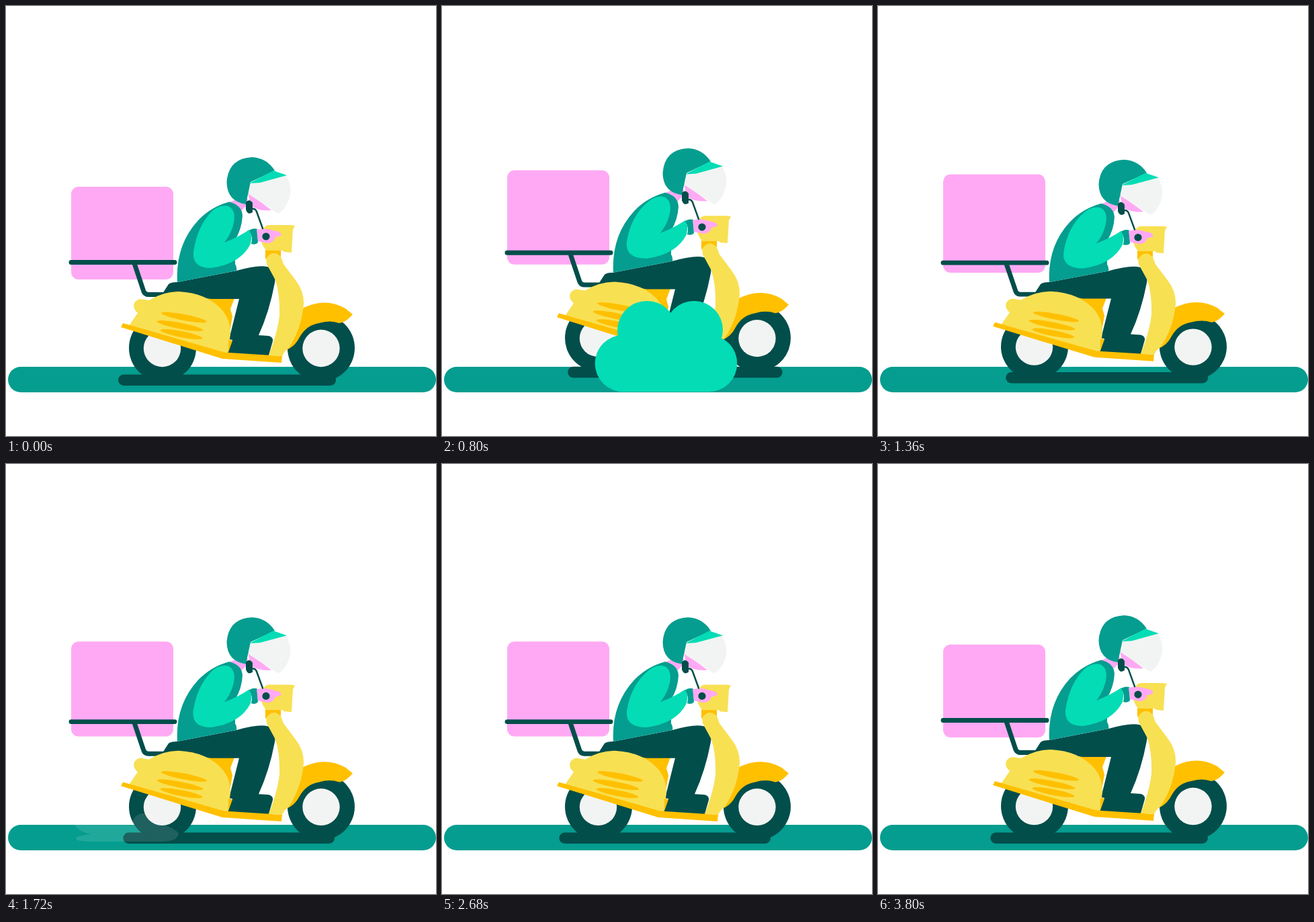
An HTML page for the animation above (3.84 s loop, 640 by 640 pixels).

```html
<!DOCTYPE html>
<html lang="en">
<head>
<meta charset="utf-8">
<title>Scooter delivery</title>
<style>
  html, body { margin: 0; width: 100%; height: 100%; overflow: hidden; background: #fff; }
  svg { display: block; width: 100vw; height: 100vh; }
  .teal { fill: #049d8f; }
  .mint { fill: #03dcb5; }
  .dark { fill: #024e4b; }
  .yellow { fill: #f8e053; }
  .orange { fill: #ffc000; }
  .pink { fill: #ffa9f4; }
  .grey { fill: #f2f4f3; }
  .line { fill: none; stroke: #024e4b; stroke-width: 7; stroke-linecap: round; stroke-linejoin: round; }
</style>
</head>
<body>
<svg viewBox="0 0 640 640">
  <rect class="teal" x="3" y="537" width="637" height="38" rx="19"/>
  <rect id="shadow" class="dark" height="16.500" rx="8.250"/>
  <rect id="box" class="pink" x="97" width="152" rx="11"/>

  <g id="scooter">
    <circle class="dark" cx="233" cy="509" r="50"/>
    <circle class="dark" cx="469" cy="509" r="50"/>
    <circle class="grey" cx="232.5" cy="509.5" r="27.7"/>
    <circle class="grey" cx="469" cy="509.5" r="27.7"/>

    <path class="line" d="M97 381.5H251M191 383L205 425Q207 429.500 212 429.500H238"/>

    <path class="orange" d="M300 435H340L334 451L337 462L331 497L337 498L330 517L300 500Z"/>
    <path class="dark" d="M231 431L242 414Q245 411 255 411L343 394Q384 382 396 391Q402 399 400 412Q392 455 376 490L391 491Q398 493 397 499L391 520H329L337 497L332 496L347 436H305L250 428Z"/>
    <path class="yellow" d="M183 476L196 457Q188 450 191 442Q196 434 206 437L213 438Q234 425 257 425Q300 427 323 454Q337 472 333 496L330 517L320 517Z"/>
    <g class="orange">
      <ellipse rx="34.500" ry="4.500" transform="translate(265 463.500) rotate(11)"/>
      <ellipse rx="35" ry="4.500" transform="translate(259 476) rotate(11)"/>
      <ellipse rx="32" ry="4.500" transform="translate(261 488.500) rotate(11)"/>
      <path d="M331 497L337 498L331 515Z"/>
      <path d="M174 472L325 515.500L411 521L410 531L322 525L171 478Z"/>
      <path d="M441 450Q475 433 505 450L516 459Q506 471 496 472Q482 467 466 472Q447 475 437 493Q430 507 417 512Z"/>
      <path d="M386 363H409L409 376H386Z"/>
    </g>
    <path class="yellow" d="M387 376Q397 361 409 373L413 384Q419 392 431 408Q444 425 443 444Q440 480 421 509Q415 513 411 521L391 520Q404 487 407 461Q408 430 401 408L388 384Z"/>
    <path class="yellow" d="M391 326H424L430 327L427 333L425 367L414 366L412 364H387Q379 353 379 344L382 333Q386 326 391 326Z"/>

    <path class="pink" d="M332 292Q344 288 348 283L360 287L358 297L349 306Z"/>
    <path class="teal" d="M255 411Q252 356 286 319Q305 299 332 291.500Q351 296 352 312Q351 332 341 348L341 384Q344 389 343 394Z"/>
    <path id="arm" class="mint"/>
    <path class="teal" d="M362 334Q367 330 374 332L375 352Q372 356 365 354Q368 344 362 334Z"/>
    <path class="pink" d="M373 333Q384 330 394 333L406 336Q411 339 409 342L401 344Q398 353 389 353L375 350Z"/>
    <circle class="dark" cx="387" cy="343" r="5.600"/>

    <path class="pink" d="M360 277L395 304Q376 306 364 297Z"/>
    <path class="grey" d="M364 264L416 251Q425 265 423 281Q418 302 405 309L361 280Z"/>
    <path class="teal" d="M364 262L357 295Q329 291 328.500 262Q331 227 366 225Q388 226 400 245Z"/>
    <path class="mint" d="M362 264L398 245L418 252L378 263Z"/>
    <path class="line" style="stroke-width:2.500" d="M365 302Q371 301 373 306L382 331"/>
    <path class="dark" d="M357 292Q362 286 367 293V307Q360 312 357 303Z"/>
  </g>

  <path id="dust" fill="#fff" d="M102 537Q108 547 126 551Q104 553 104 558Q106 562 130 562H235Q256 561 257 550Q252 542 230 536Q222 520 203 520Q190 522 187 537Z"/>

  <g id="cloud" class="mint">
    <circle cx="77" cy="483" r="44"/>
    <circle cx="147" cy="482" r="43"/>
    <circle cx="42" cy="532" r="42.300"/>
    <circle cx="169" cy="532" r="42.300"/>
    <path d="M42 500H169V574.300H42Z"/>
  </g>
</svg>
<script>
  const LOOP = 3840, STEP = 40, BOB = 960;
  const part = id => document.getElementById(id);
  const [shadow, box, scooter, arm, dust, cloud] =
    ['shadow', 'box', 'scooter', 'arm', 'dust', 'cloud'].map(part);

  const set = (el, attrs) => {
    for (const key in attrs) el.setAttribute(key, attrs[key]);
  };
  const clamp = v => Math.max(0, Math.min(1, v));
  // 0 at the start of each period, 1 halfway through
  const wave = (t, period) => (1 - Math.cos(2 * Math.PI * t / period)) / 2;

  function draw(t) {
    const bob = wave(t, BOB);
    const hop = Math.sin(Math.PI * clamp((t - 480) / 960));

    // the scooter squashes towards the ground and hops once
    set(scooter, { transform: `matrix(1 0 0 ${1 - 0.0215 * bob} 0 ${13.9 * bob - 18 * hop})` });

    const top = 269 - 13 * bob - 24.5 * hop;
    set(box, { y: top, height: 138 + 9 * bob });

    set(shadow, {
      x: 167 + 20 * bob + 17.5 * hop,
      y: 548.5 - 13.5 * hop,
      width: 324 - 25 * bob + 2 * hop
    });

    const elbow = 279 - 4.5 * wave(t, 2 * BOB);
    set(arm, {
      d: `M331 298Q345 305 337 330Q333 342 325 352Q346 344 362 333Q367 340 364 354
          Q349 384 305 390Q${elbow - 2} 390 ${elbow} 366Q${elbow + 6} 326 308 304Q320 295 331 298Z`
    });

    set(cloud, { transform: `translate(${228 - 1.194 * (t - 800)} 0)` });

    const fade = clamp((t - 1560) / 160) * clamp((2400 - t) / 500);
    set(dust, { opacity: 0.11 * fade, transform: `translate(${-0.25 * (t - 1720)} 0)` });
  }

  function tick() {
    const t = performance.now() % LOOP;
    draw(Math.floor(t / STEP) * STEP);
    requestAnimationFrame(tick);
  }
  tick();
</script>
</body>
</html>
```
